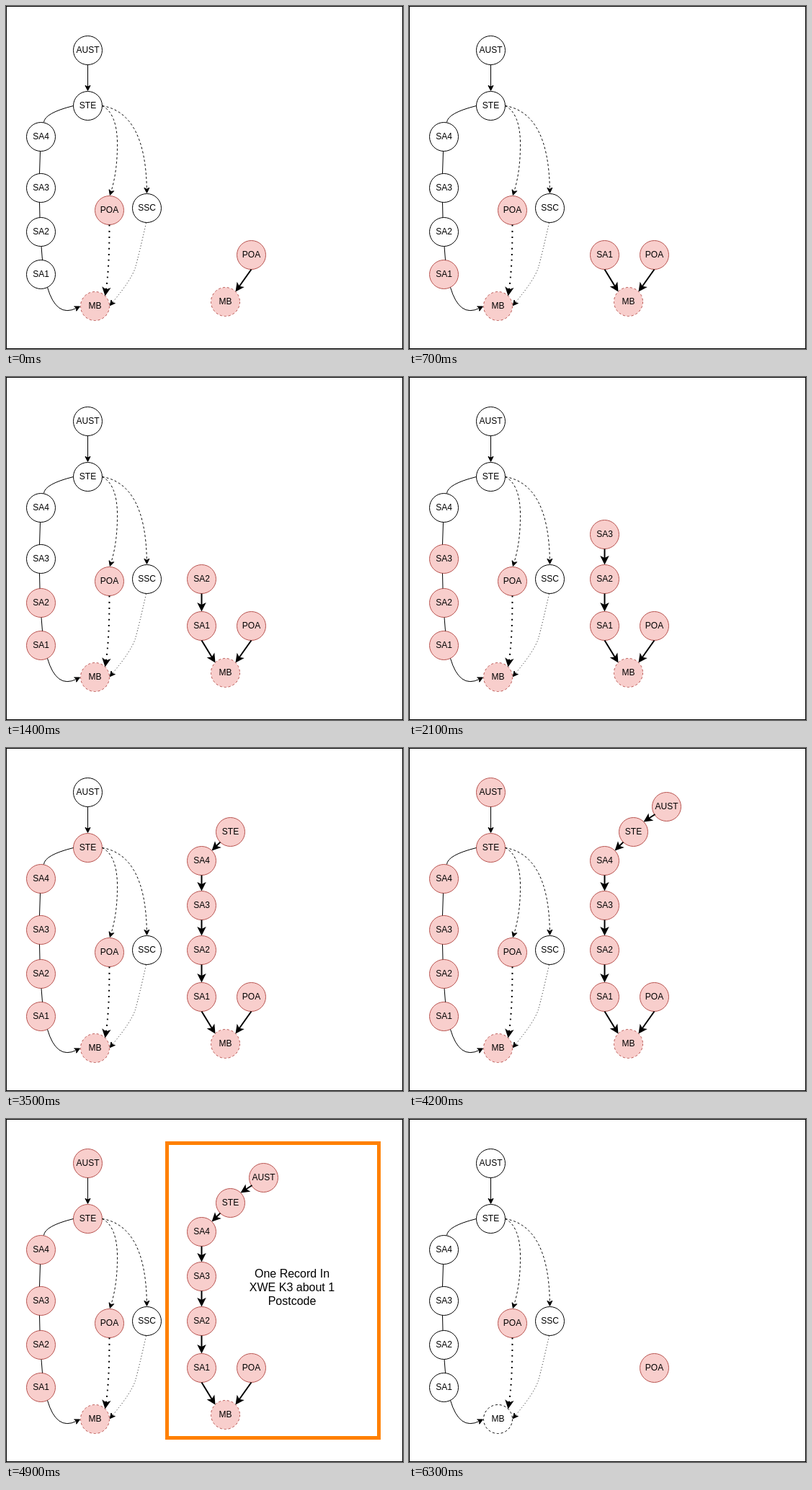
An HTML page for the animation above (7000 ms loop, 551 by 476 pixels).

```html
<!DOCTYPE html>
<html lang="en">
<head>
<meta charset="utf-8">
<style>
  html, body { margin: 0; width: 100%; height: 100%; overflow: hidden; background: #fff; }
  svg { display: block; }
  text { font: 12px "Liberation Sans", Arial, sans-serif; text-anchor: middle; }
  .note { font-size: 16px; }
  .node { fill: #fff; stroke: #000; }
  .lit .node { fill: #f8cecc; stroke: #b85450; }
  .edge { fill: none; stroke: #000; }
  .head { stroke: #000; }
</style>
</head>
<body>
<svg id="stage" width="551" height="476" viewBox="0 0 551 476">
  <rect x=".5" y=".5" width="550" height="475" fill="#fff" stroke="#000"/>
</svg>
<script>
const STEP = 700, STEPS = 10;
const stage = document.getElementById('stage');
const reveals = []; // [step, element]: visible from that step on
const lights = [];  // [step, element]: highlighted from that step on

function add(parent, tag, attrs, text) {
  const el = document.createElementNS('http://www.w3.org/2000/svg', tag);
  for (const key in attrs) el.setAttribute(key, attrs[key]);
  if (text) el.textContent = text;
  return parent.appendChild(el);
}

function node(parent, name, x, y) {
  const g = add(parent, 'g', {});
  add(g, 'circle', { class: 'node', cx: x, cy: y, r: 20, 'stroke-dasharray': name === 'MB' ? '3 3' : 'none' });
  add(g, 'text', { x, y: y + 3.5 }, name);
  return g;
}

function line(d, width = 1, dash = 'none', parent = stage) {
  add(parent, 'path', { class: 'edge', d, 'stroke-width': width, 'stroke-dasharray': dash });
}

// Path prefix d is completed up to the arrowhead, which points from (cx, cy) to (tx, ty).
function arrow(d, [cx, cy], [tx, ty], width = 1, dash = 'none', parent = stage) {
  const dist = Math.hypot(tx - cx, ty - cy);
  const ux = (tx - cx) / dist, uy = (ty - cy) / dist;
  const size = 6 + width, tip = width * 1.118;
  const at = (back, side) =>
    `${tx - ux * (tip + back) - uy * side} ${ty - uy * (tip + back) + ux * side}`;
  const notch = at(size * 0.75, 0);
  line(`${d} ${notch}`, width, dash, parent);
  add(parent, 'path', {
    class: 'head', 'stroke-width': width,
    d: `M${at(0, 0)}L${at(size, size / 2)}L${notch}L${at(size, -size / 2)}Z`
  });
}

function straight(from, to, width, parent) {
  arrow(`M${from}L`, from, to, width, 'none', parent);
}

// Full hierarchy: name, x, y, step at which it lights up
[
  ['AUST', 113.5, 61.5, 7], ['STE', 113.5, 138.5, 6], ['SA4', 48.5, 181.5, 5],
  ['SA3', 48.5, 252.5, 4], ['SA2', 48.5, 313.5, 3], ['SA1', 48.5, 372.5, 2],
  ['POA', 143.5, 283.5, 0], ['SSC', 195.5, 280.5, STEPS], ['MB', 123.5, 416.5, 1]
].forEach(([name, x, y, step]) => lights.push([step, node(stage, name, x, y)]));

straight([113.5, 81.5], [113.5, 118.5], 1, stage);
line('M93.5 138.5Q53.5 148.5 52.5 161.5');
line('M47.5 201.5L46.5 232.5');
line('M46.5 272.5L47 293.5');
line('M49 333.5L50.5 352.5');
arrow('M57.5 390.5Q70 433', [70, 433], [103.5, 416.5]);
arrow('M133.5 138.5Q153.5 148.5 154.5 188.5Q155 228', [155, 228], [144, 263.5], 1, '3 3');
arrow('M133.5 138.5Q193.5 148.5', [193.5, 148.5], [195.5, 260.5], 1, '3 3');
arrow('M143.5 303.5Q143.5 363.5', [143.5, 363.5], [137.5, 402.5], 2, '2 6');
arrow('M194.5 301Q185 343 179.5 363Q174 380', [174, 380], [143.5, 416.5], 1, '1 3');

// Path for one record: name, x, y, step, outgoing arrow start and end
[
  ['POA', 340.5, 345.5, 0],
  ['MB', 304.5, 410.5, 1, [340.5, 365.5], [318.5, 396.5]],
  ['SA1', 271.5, 345.5, 2, [271.5, 365.5], [290.5, 396.5]],
  ['SA2', 271.5, 280.5, 3, [271.5, 300.5], [271.5, 325.5]],
  ['SA3', 271.5, 218.5, 4, [271.5, 238.5], [271.5, 260.5]],
  ['SA4', 271.5, 156.5, 5, [271.5, 176.5], [271.5, 198.5]],
  ['STE', 311.5, 116.5, 6, [297.4, 130.6], [285.6, 142.4]],
  ['AUST', 357.5, 81.5, 7, [341.5, 92], [325.5, 102.5]]
].forEach(([name, x, y, step, from, to]) => {
  const g = add(stage, 'g', { class: 'lit' });
  node(g, name, x, y);
  if (from) straight(from, to, 2, g);
  reveals.push([step, g]);
});

const frame = add(stage, 'g', {});
add(frame, 'rect', {
  x: 223.5, y: 33.5, width: 294, height: 409, fill: 'none', stroke: '#ff8000', 'stroke-width': 5
});
['One Record In', 'XWE K3 about 1', 'Postcode'].forEach((text, i) =>
  add(frame, 'text', { class: 'note', x: 397, y: 220 + i * 19 }, text));
reveals.push([8, frame]);

function draw(now) {
  // The loop opens one step in; the bare state comes last.
  const step = (Math.floor(now / STEP) + 1) % STEPS;
  for (const [from, el] of reveals) el.style.display = step >= from ? '' : 'none';
  for (const [from, el] of lights) el.classList.toggle('lit', step >= from);
  requestAnimationFrame(draw);
}
draw(0);
</script>
</body>
</html>
```
